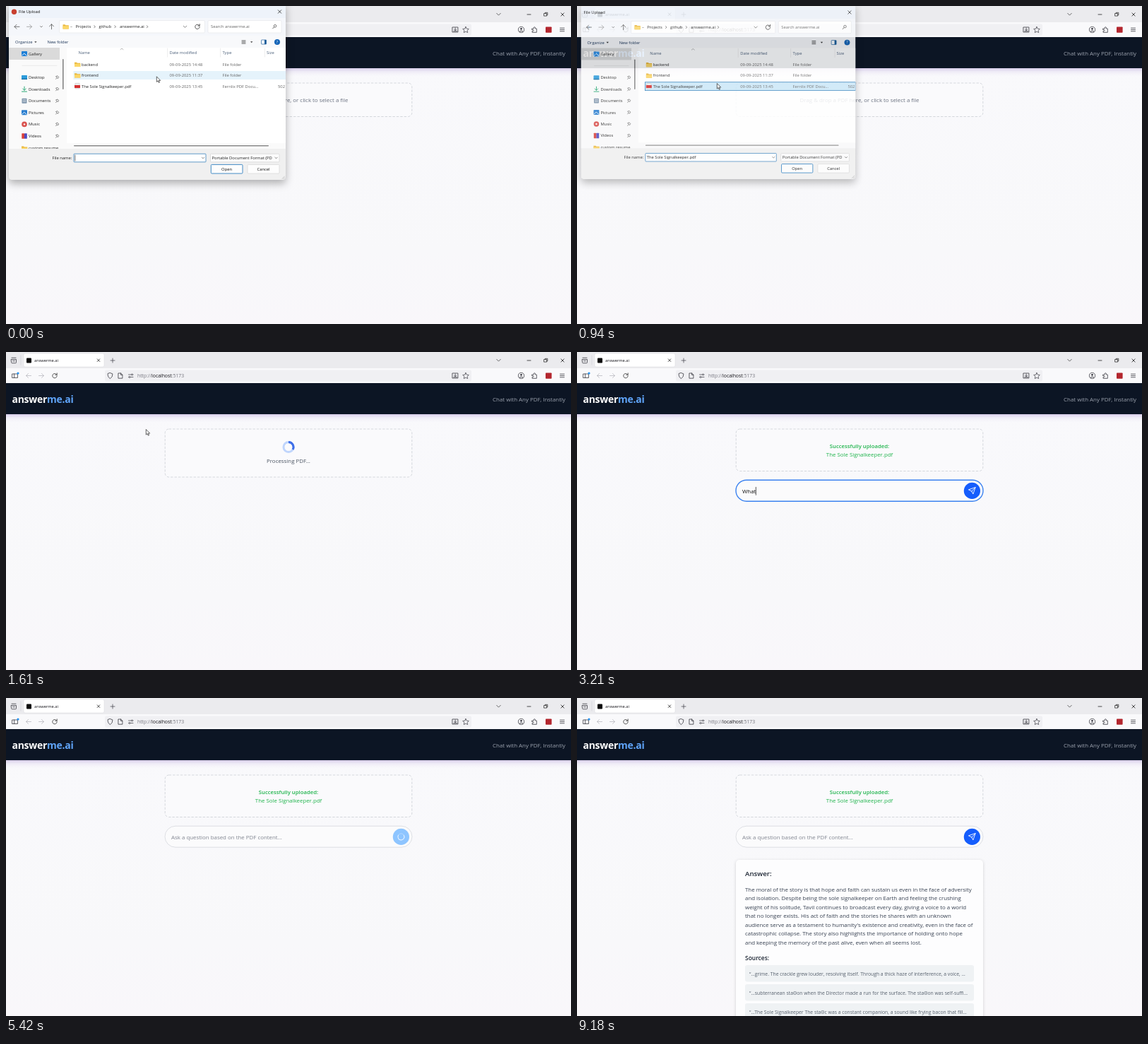
These frames come from a looping animation (800x450 px, 9670 ms). An HTML page:

```html
<!DOCTYPE html>
<html lang="en">
<head>
<meta charset="utf-8">
<title>answerme.ai</title>
<style>
  html, body { margin: 0; width: 100%; height: 100%; overflow: hidden; background: #f9f9fb; }
  svg { display: block; width: 100vw; height: 100vh; }
  text { font-family: "Open Sans", "Noto Sans", sans-serif; white-space: pre; }
  .line { fill: none; stroke-linecap: round; stroke-linejoin: round; }
  #dialog { filter: drop-shadow(0 5px 6px rgba(0, 0, 0, .3)); }
</style>
</head>
<body>
<svg id="stage" viewBox="0 0 800 450" xmlns="http://www.w3.org/2000/svg"></svg>
<script>
const LOOP = 9670;
const BOOK = 'The Sole Signalkeeper';
const FILE = BOOK + '.pdf';
const QUESTION = 'What is the moral of the story?';

const T_SELECT = 800, T_CLOSE = 925, T_CLOSED = 1040;
const T_UPLOADED = 2250, T_FOCUS = 2780, T_TYPE = 3000, KEY_MS = 50;
const T_SEND = 4700, T_ANSWER = 6300, T_BAR_FADE = 8850, T_BAR_GONE = 9180;

const rect = (x, y, w, h, fill, rx = 0, extra = '') =>
  `<rect x="${x}" y="${y}" width="${w}" height="${h}" fill="${fill}" rx="${rx}" ${extra}/>`;
const line = (d, color = '#3a3a42', w = 0.8, extra = '') =>
  `<path class="line" d="${d}" stroke="${color}" stroke-width="${w}" ${extra}/>`;
const circle = (x, y, r, fill, extra = '') =>
  `<circle cx="${x}" cy="${y}" r="${r}" fill="${fill}" ${extra}/>`;
// y is the optical middle of the line
const text = (x, y, size, str, fill = '#222', extra = '') =>
  `<text x="${x}" y="${(y + size * 0.34).toFixed(2)}" font-size="${size}" fill="${fill}" ${extra}>${str}</text>`;
const group = (id, body, extra = '') => `<g id="${id}" ${extra}>${body}</g>`;
const stroke = (color, w = 0.7) => `stroke="${color}" stroke-width="${w}"`;
const MID = 'text-anchor="middle"';
const chevron = (x, y, r = 1.7, color = '#555') =>
  line(`M${x - r} ${y - r / 2}l${r} ${r} ${r} ${-r}`, color, 0.7);
const cross = (x, y, r = 2) =>
  line(`M${x - r} ${y - r}l${2 * r} ${2 * r}m0 ${-2 * r}l${-2 * r} ${2 * r}`, '#222', 0.8);
const arrow = (x, y, dir, color) =>
  line(`M${x - 3.5} ${y}h7M${x + dir * 0.5} ${y - 3}l${dir * 3} 3 ${-dir * 3} 3`, color, 0.8);
const reload = (x, y) =>
  line(`M${x + 2.8} ${y - 1.4}a3.2 3.2 0 1 0 .4 1.6M${x + 3.2} ${y - 3.6}v2.4h-2.4`, '#333', 0.8);
const folder = (x, y) =>
  `<path d="M${x} ${y - 3}h3l1 1h4.3v5.2h-8.3z" fill="#e9b840"/>` + rect(x, y - 1, 8.3, 4.3, '#fbd768', 0.5);

function browser() {
  const dark = '#3a3a42', pale = '#b9b9c0';
  return rect(0, 0, 800, 23, '#ebebee') + rect(0, 23, 800, 21, '#f9f9fb') +
    rect(140, 25.5, 519, 16, '#f0f0f3', 2) +
    line('M7.5 10.5h7v4.2q0 1-1 1h-5q-1 0-1-1zM8 8.2h6M9.6 12.7h2.8', dark) +
    line('M21 5v13', '#cfcfd4', 0.6) +
    rect(25, 2, 114, 19, '#fff', 2, stroke('#d9d9de', 0.5)) +
    rect(29, 8.4, 7, 7, '#0a0a0a', 1) + text(40, 12, 5.7, 'answerme.ai', '#15141a') +
    cross(131, 11.7, 1.8) + line('M148 12h6M151 9v6', dark, 0.7) +
    chevron(697.5, 11.7, 2.8, '#333') + line('M738 12h5', '#222') +
    line('M762 10.5h3.6v3.6H762zM763.3 10.5v-1.2h3.5v3.6h-1.2', '#222', 0.7) + cross(788, 12, 2.1) +
    line('M9 31h7.5v5.5H9zM11.6 31v5.5', dark) + circle(17, 30, 1.6, '#2492f0') +
    arrow(32, 33.5, -1, pale) + arrow(50, 33.5, 1, pale) + reload(69, 33.5) +
    line('M147.5 29.6l3.4 1.3q.3 4.7-3.4 6.7-3.7-2-3.4-6.7z', dark) +
    line('M159.3 30h3.3l2.3 2.2v5h-5.6zM162.5 30v2.4h2.3', dark) +
    line('M173.5 32h6.5M173.5 35.5h6.5', dark, 0.7) +
    circle(175, 35.5, 1, '#f0f0f3', stroke(dark)) + circle(178.5, 32, 1, '#f0f0f3', stroke(dark)) +
    text(186, 34, 6.83, 'http://<tspan fill="#15141a">localhost</tspan>:5173', '#777780') +
    line('M632.3 30h7.6v7h-7.6zM636.1 31v3.5M634.5 33l1.6 1.6 1.6-1.6M633.7 35.7h5', dark) +
    line('M651 29.4l1.3 2.7 3 .4-2.2 2.1.6 3-2.7-1.4-2.7 1.4.6-3-2.2-2.1 3-.4z', dark, 0.7) +
    circle(729.5, 33.5, 4.1, 'none', stroke(dark, 0.8)) + circle(729.5, 32.3, 1.4, dark) +
    line('M727.2 36q2.3-2 4.6 0', dark, 1) +
    line('M745 32h2.2q-.4-2.3 1.1-2.3t1.1 2.3h1.9v5.3H745v-1.8q2.1.2 2.1-1t-2.1-1z', dark) +
    rect(764, 29.5, 8.6, 8.2, '#b3262e', 0.8) +
    line('M784.5 31.2h6M784.5 33.5h6M784.5 35.8h6', dark);
}

function page() {
  return rect(0, 44, 800, 406, 'url(#bg)') + rect(0, 88, 800, 12, 'url(#glow)') +
    rect(0, 44, 800, 44, '#0c1524') +
    text(8.5, 67, 14, 'answer<tspan fill="#60a5fa">me.ai</tspan>', '#fff', 'font-weight="700" letter-spacing="-.27"') +
    text(792, 67, 7.95, 'Chat with Any PDF, Instantly', '#9ca3af', 'text-anchor="end"');
}

function content() {
  const answer = [
    'The moral of the story is that hope and faith can sustain us even in the face of adversity',
    'and isolation. Despite being the sole signalkeeper on Earth and feeling the crushing',
    'weight of his solitude, Tavil continues to broadcast every day, giving a voice to a world',
    'that no longer exists. His act of faith and the stories he shares with an unknown',
    'audience serve as a testament to humanity\'s existence and creativity, even in the face of',
    'catastrophic collapse. The story also highlights the importance of holding onto hope',
    'and keeping the memory of the past alive, even when all seems lost.'
  ];
  const sources = [
    '“...grime. The crackle grew louder, resolving itself. Through a thick haze of interference, a voice, ...',
    '“...subterranean staΘon when the Director made a run for the surface. The staΘon was self-suffi...',
    `“...${BOOK} The staΘc was a constant companion, a sound like frying bacon that fill...`
  ];
  const green = '#1fb44c', bold = 'font-weight="600"';
  return rect(225.2, 109, 349.6, 48, '#fafafc', 5.5, `id="drop" ${stroke('#d1d4da', 0.9)} stroke-dasharray="3.4 2"`) +
    group('idle', text(400, 133.3, 7.9, 'Drag &amp; drop a PDF here, or click to select a file', '#6b7280', MID)) +
    group('busy', circle(400, 134.5, 7, 'none', stroke('#bfd5fc', 3)) +
      line('M400 127.5A7 7 0 0 1 406.06 138', '#3f6fe8', 3, 'id="spin" style="stroke-linecap:butt"') +
      text(400, 154.3, 7.9, 'Processing PDF...', '#4b5563', MID)) +
    group('done', text(400, 133.3, 7.75, 'Successfully uploaded:', green, MID + ' ' + bold) +
      text(400, 145.8, 7.85, FILE, green, MID) +
      rect(225, 181.2, 350, 30, '#fbfbfc', 15, 'id="field"') +
      text(234, 197, 7.9, '', '#808590', 'id="input"') + line('M0 191.3v11', '#111', 0.7, 'id="caret"') +
      circle(559.4, 196.4, 11.6, '#155dfc', 'id="send"') +
      line('M564 191.8l-3.2 9.2-2-4-4-2zM564 191.8l-5.2 5.2', '#fff', 0.9, 'id="plane"') +
      group('wait', circle(559.4, 196.4, 4.5, 'none', stroke('#b9dbff', 0.9)) +
        line('M555.5 194.2A4.5 4.5 0 1 0 563.3 194.2', '#e6f2ff', 1, 'id="ring"'))) +
    group('result',
      rect(225, 229, 350, 240, '#fdfdfe', 5, 'style="filter:drop-shadow(0 1px 2px rgba(0,0,0,.16))"') +
      text(238, 249, 9.7, 'Answer:', '#1b2432', bold) +
      answer.map((s, i) => text(238, 271 + i * 12.5, 7.9, s, '#374151')).join('') +
      text(238, 367.7, 8.45, 'Sources:', '#1b2432', bold) +
      sources.map((s, i) => rect(238, 378 + i * 27, 324, 23.6, '#eff2f4', 3) +
        text(244, 390.5 + i * 27, 6.8, s, '#56606d')).join('')) +
    rect(797, 50, 2, 335, '#85858c', 1, 'id="bar"');
}

function sidebar() {
  const items = [['Desktop', '#2d9cdb'], ['Downloads', '#2aa876'], ['Documents', '#7d94ab'],
    ['Pictures', '#2b7fd0'], ['Music', '#d9534f'], ['Videos', '#5b4bb5']];
  const pin = y => line(`M70.6 ${y + 2.3}l1.5-1.6M70.8 ${y - 1}l2.6 2.6 1.3-2-1.4-1.5z`, '#555', 0.7);
  const icons = [
    y => rect(22, y - 3, 8, 6, '#2d9cdb', 0.8) + rect(22, y + 1.8, 8, 1.2, '#156a9e'),
    y => line(`M26 ${y - 3.5}v5M23.7 ${y - 0.6}l2.3 2.3 2.3-2.3M22.5 ${y + 3.5}h7`, '#2aa876', 1),
    y => rect(22.5, y - 3.5, 7, 7, '#7d94ab', 0.8) + line(`M24 ${y - 1.3}h4M24 ${y + 1}h4`, '#fff', 0.7),
    y => rect(22, y - 3.5, 8, 7, '#2b7fd0', 0.8) + line(`M22.7 ${y + 2.5}l3-3 3.5 3`, '#fff', 0.9),
    y => circle(26, y, 3.8, '#d9534f') + circle(26, y, 1.2, '#fff'),
    y => rect(22.3, y - 3.8, 3.8, 7.6, '#d9403a', 0.6) + rect(26, y - 3.8, 3.8, 7.6, '#4e4cc0', 0.6)
  ];
  return rect(4, 59, 72, 17, '#dadada') + rect(22, 64, 8, 7, '#1f7fd6', 0.8) +
    line('M22.7 70l3-3 3.4 3', '#fff', 0.9) + text(32, 67.7, 5.85, 'Gallery') +
    line('M23 84.3h49', '#dedede', 0.6) +
    items.map(([name], i) => {
      const y = 101 + i * 16.6;
      return icons[i](y) + text(32, y, 5.85, name) + pin(y);
    }).join('') +
    `<g clip-path="url(#side)">${folder(22, 201.5)}${text(32, 201, 5.85, 'custom resume')}</g>` +
    rect(80, 75, 1.6, 43, '#858585', 0.8);
}

function row(y, name, date, kind) {
  return text(107, y, 5.85, name) + text(231.5, y, 5.85, date, '#666') + text(306.5, y, 5.85, kind, '#666');
}

function dialog() {
  const nav = '#555', size = 5.85;
  const heads = [[102.5, 'Name'], [231.5, 'Date modified'], [306.5, 'Type'], [369, 'Size']];
  const body = rect(4, -4, 392, 250, '#f0f0f0', 4) +
    rect(4, 0, 392, 17, '#eef3fa') + rect(4, 17, 392, 25, '#f5f7fb') + rect(4, 42, 392, 17, '#f8f9fb') +
    rect(4, 59, 392, 143, '#fafafa') + rect(86, 59, 310, 135, '#fff') +
    circle(11.5, 8.2, 3.7, '#c8402f', 'id="mark"') + text(18, 8.3, size, 'File Upload', '#111', 'id="title"') +
    cross(387.5, 8, 2.2) +
    arrow(15.5, 29.3, -1, nav) + arrow(33, 29.3, 1, '#999') + chevron(50, 29.3, 1.5) +
    line('M64.5 32.8v-7M61.5 28.8l3-3 3 3', nav) +
    rect(75.5, 20.5, 206, 17.5, '#fff', 1.5, stroke('#e2e4e8', 0.6)) + folder(80.5, 29.3) +
    text(91, 29, size, '–', '#444') + text(98.5, 29.3, size, 'Projects') + text(131.5, 29.3, size, 'github') +
    text(161, 29.3, size, 'answerme.ai') +
    [125.5, 154.5, 200].map(x => line(`M${x - 0.6} 27.8l1.4 1.5-1.4 1.5`, '#444', 0.7)).join('') +
    chevron(253.5, 29.3, 2.2) + reload(271, 29.2) +
    rect(286, 20.5, 104, 17.5, '#fff', 1.5, stroke('#e2e4e8', 0.6)) +
    text(290, 29.5, size, 'Search answerme.ai', '#666') +
    circle(381, 28.3, 1.8, 'none', stroke('#444')) + line('M379.7 29.7l-2.1 2.2', '#444') +
    text(13, 51, size, 'Organize', '#1d3557') + '<path d="M40.2 50.2h3.4l-1.7 1.9z" fill="#333"/>' +
    text(58.5, 51, size, 'New folder', '#1d3557') +
    line('M334 49h5M334 51h5M334 53h5', '#333') + '<path d="M346 50.2h3.4l-1.7 1.9z" fill="#333"/>' +
    rect(361.5, 48, 7, 6, '#fff', 0.5, stroke('#1b5e9b')) + rect(366, 48, 2.5, 6, '#1b5e9b') +
    circle(384, 51, 4, '#1565b8') + text(384, 51, 5.6, '?', '#fff', MID) +
    sidebar() +
    heads.map(([x, s]) => text(x, 66.3, size, s, '#4c607a')).join('') +
    [228.5, 303.5, 366.5].map(x => line(`M${x} 60v12`, '#e3e3e3', 0.6)).join('') +
    line('M162 61.6l2-1.6 2 1.6', '#888', 0.6) +
    rect(95.5, 92, 300.5, 12, '#e5f3fb', 0, 'id="hover"') +
    folder(97, 82.7) + row(82.7, 'backend', '09-09-2025 14:48', 'File folder') +
    folder(97, 98.3) + row(98.3, 'frontend', '09-09-2025 11:37', 'File folder') +
    rect(97.8, 109.3, 6.4, 7.8, '#eee', 0.5, stroke('#aaa', 0.4)) + rect(97, 112, 8, 4, '#d32f2f', 0.4) +
    row(113.6, FILE, '09-09-2025 13:45', 'Fernlix PDF Docu...') + text(385, 113.6, size, '502', '#666') +
    rect(96, 197, 276, 1.5, '#8b8b8b', 0.7) +
    text(65.5, 215, size, 'File name:') +
    rect(96, 209.2, 187, 11.6, '#fff', 0.8, stroke('#3c83bd', 0.8)) + line('M97.8 211v8', '#111', 0.6, 'id="namecaret"') +
    text(98, 215, size, '', '#111', 'id="filename"') + chevron(279, 215, 1.6) +
    rect(289.5, 209.2, 97.5, 11.6, '#fbfbfb', 0.8, stroke('#d0d0d0', 0.6)) +
    text(291.5, 215, size, 'Portable Document Format (PD') + chevron(382.5, 215, 1.6) +
    rect(290.3, 224.4, 44.7, 12.6, '#fdfdfd', 1.2, stroke('#2f7fc0', 0.9)) + text(312.6, 230.8, size, 'Open', '#111', MID) +
    rect(342, 224.4, 45, 12.6, '#fdfdfd', 1.2, stroke('#d0d0d0', 0.6)) + text(364.5, 230.8, size, 'Cancel', '#111', MID) +
    line('M391 244.5l3.5-3.5M393 244.5l1.5-1.5', '#aaa', 0.6);
  return group('dialog', `<g clip-path="url(#win)">${body}</g>`);
}

const stage = document.getElementById('stage');
stage.innerHTML = `<defs>
  <linearGradient id="bg" x2="0" y2="1"><stop stop-color="#f9f9fc"/><stop offset=".75" stop-color="#f8f8fa"/><stop offset="1" stop-color="#f9f7fa"/></linearGradient>
  <linearGradient id="glow" x2="0" y2="1"><stop stop-color="#b9a6da" stop-opacity=".55"/><stop offset=".4" stop-color="#cfc2e6" stop-opacity=".25"/><stop offset="1" stop-color="#e6e0f2" stop-opacity="0"/></linearGradient>
  <clipPath id="side"><rect x="4" y="59" width="76" height="143"/></clipPath>
  <clipPath id="win"><rect x="4" y="-4" width="392" height="250" rx="4"/></clipPath>
</defs>` + browser() + page() + content() + dialog() +
  group('arrow', '<path d="M0 0V7.6L1.8 6 3 8.7 4.2 8.2 3 5.6H5.4Z" fill="#fff" stroke="#222" stroke-width=".7"/>') +
  group('beam', line('M-1.5-4.5h3M0-4.5v9M-1.5 4.5h3', '#222', 0.7));

const el = {};
stage.querySelectorAll('[id]').forEach(n => el[n.id] = n);

const set = (id, attrs) => { for (const k in attrs) el[id].setAttribute(k, attrs[k]); };
const show = (id, on) => set(id, { display: on ? 'inline' : 'none' });
const write = (id, str) => { if (el[id].textContent !== str) el[id].textContent = str; };
const ramp = (t, a, b) => Math.min(1, Math.max(0, (t - a) / (b - a)));
const ease = p => p * p * (3 - 2 * p);

function drawDialog(t, cursorY) {
  const p = ramp(t, T_CLOSE, T_CLOSED), picked = t >= T_SELECT;
  show('dialog', p < 1);
  const s = 1 - 0.06 * p;
  set('dialog', { opacity: 1 - p, transform: `translate(200 123) scale(${s}) translate(-200 -123)` });
  show('mark', p === 0);
  set('title', { x: p ? 8 : 18 });
  const onFile = cursorY > 105;
  set('hover', {
    y: onFile ? 107.6 : 92, fill: picked ? '#cce8f8' : '#e5f3fb',
    stroke: picked ? '#2c7cb8' : 'none', 'stroke-width': 0.8
  });
  write('filename', picked ? FILE : '');
  show('namecaret', !picked);
}

function drawPage(t) {
  const busy = t >= T_CLOSED - 10 && t < T_UPLOADED, done = t >= T_UPLOADED;
  const focus = t >= T_FOCUS && t < T_SEND, waiting = t >= T_SEND && t < T_ANSWER;
  show('idle', !busy && !done);
  show('busy', busy);
  show('done', done);
  show('result', t >= T_ANSWER);
  set('drop', { height: done ? 59.5 : busy ? 68 : 47.5 });
  set('spin', { transform: `rotate(${(t - 1610) * 0.36} 400 134.5)` });

  const keys = t < T_SEND ? Math.max(0, Math.floor((t - T_TYPE) / KEY_MS)) : 0;
  write('input', keys ? QUESTION.slice(0, keys) : 'Ask a question based on the PDF content...');
  set('input', { fill: keys ? '#111' : '#808590' });
  set('field', { stroke: focus ? '#3b82f0' : '#d6d8dd', 'stroke-width': focus ? 1.4 : 0.8 });
  show('caret', focus);
  if (focus) {
    const x = 234 + (keys ? el.input.getComputedTextLength() : 0);
    set('caret', { transform: `translate(${x} 0)` });
  }
  set('send', { fill: waiting ? '#8ec5ff' : '#155dfc' });
  show('plane', !waiting);
  show('wait', waiting);
  set('ring', { transform: `rotate(${(t - 5420) * 0.36} 559.4 196.4)` });
  set('bar', { opacity: t < T_ANSWER ? 0 : 1 - ramp(t, T_BAR_FADE, T_BAR_GONE) });
}

function draw(t) {
  const a = ease(ramp(t, 80, 600)), b = ease(ramp(t, 2350, 2750));
  const x = 213.3 - 15 * a + 102 * b, y = 99.8 + 9.7 * a + 87 * b;
  const at = { transform: `translate(${x} ${y})` };
  const overField = b > 0.9;
  set('arrow', at);
  set('beam', at);
  show('arrow', t < T_TYPE && !overField);
  show('beam', t < T_TYPE && overField);
  drawDialog(t, y);
  drawPage(t);
}

const start = performance.now();
function tick(now) {
  draw(Math.max(0, now - start) % LOOP);
  requestAnimationFrame(tick);
}
draw(0);
requestAnimationFrame(tick);
</script>
</body>
</html>
```
